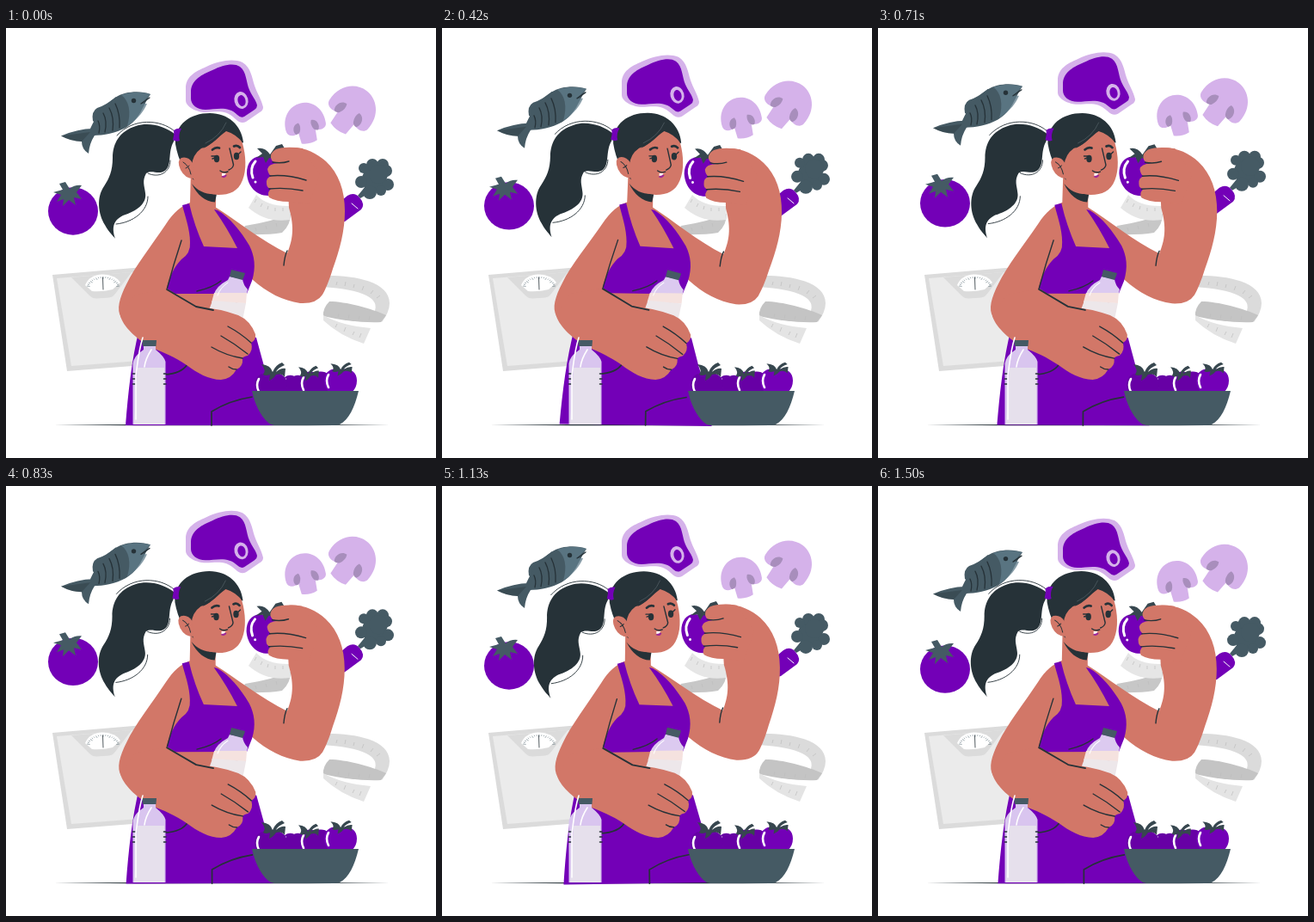
Recreate the animation shown at these times as an HTML page. Size 500 by 500 pixels, loop 1.54 s.

```html
<!DOCTYPE html>
<html lang="en">
<head>
<meta charset="utf-8">
<title>Healthy food</title>
<style>
html, body { margin: 0; width: 100%; height: 100%; overflow: hidden; background: #fff; }
svg { display: block; width: 100vw; height: 100vh; }
.p { fill: #7300b7; }
.l { fill: #d5b2ea; }
.m { fill: #a88ebc; }
.s { fill: #455a64; }
.d { fill: #263238; }
.k { fill: #d27768; }
.w { fill: #fff; }
.g { fill: #dbdbdb; }
.ln { fill: none; stroke: #263238; stroke-width: 1.4; stroke-linecap: round; stroke-linejoin: round; }
.wl { fill: none; stroke: #fff; stroke-width: 1.6; stroke-linecap: round; }
.tick { fill: none; stroke: #bdbdbd; stroke-width: .7; }
</style>
</head>
<body>
<svg viewBox="0 0 500 500">
<defs>
  <g id="mushroom">
    <path class="l" d="M-28 8C-30-14-15-27 0-27S30-14 28 8C27 15 18 16 12 13L11 28Q0 32-11 28L-12 13C-18 16-27 15-28 8Z"/>
    <path class="m" d="M-9-1C-17-1-20 9-16 14Q-13 15-10 12Q-6 5-9-1ZM9-1C17-1 20 9 16 14Q13 15 10 12Q6 5 9-1Z"/>
  </g>
  <g id="fruit">
    <path d="M0-9C-8-13-19-9-19 3C-19 14-11 21 0 21S19 14 19 3C19-9 8-13 0-9Z"/>
    <path class="wl" d="M-14-4Q-18 3-14 11" style="stroke-width:2.6"/>
  </g>
  <path id="leaf" fill="#37474f" d="M-14-9Q-3-8-1 0Q2-8 10-11L13-8Q5-5 3 0Q9-5 14-4L13 6Q10 1 3 3Q0 8-5 10L-4 3Q-9 5-12 3Q-8-2-14-9Z"/>
</defs>

<path class="d" d="M56 461.600L150 460.900H350L446 461.600L350 462.200H150Z"/>

<g id="scale">
  <path class="g" d="M54 287L160 278L172 391L71 399Z"/>
  <path fill="#ebebeb" d="M59 291L160 283L168 386L76 393Z"/>
  <path class="g" d="M76 290L97 311Q101 315 106 314.500L120 313.500Q124 313 127 309L146 284Z"/>
  <path class="w" d="M92 299Q97 287 112 286.500Q128 287 133 296L124 304Q112 307 100 306Z"/>
  <g id="dial" class="tick" style="stroke:#455a64;stroke-width:.5"></g>
  <path class="ln" d="M112.500 290L113 304" style="stroke-width:.8"/>
</g>

<g id="tape">
  <path fill="#c7c7c7" d="M331 216Q310 225 278 230L273 240Q305 241 321 238Q331 229 331 216Z"/>
  <path fill="#e6e6e6" d="M291 194Q304 208 331 207L330 223Q302 227 282 209Z"/>
  <path class="g" d="M368 288C400 287 446 293 446 320Q446 330 437 342L428 331Q440 306 368 301Z"/>
  <path fill="#c4c4c4" d="M376 318C395 318 425 326 442 334L436 342C415 343 390 340 369 335Q368 326 376 318Z"/>
  <path fill="#e4e4e4" d="M369 334Q390 346 424 349L416 367Q388 358 369 340Z"/>
  <path class="tick" d="M289 203l2-4M296 208l2-4M304 211l1-4M313 213v-4M322 213v-4M290 232l1 4M302 230l1 4M314 227l1 4M384 299l1-4M394 300l1-5M404 302l1-4M414 305l2-5M424 309l3-4M431 314l4-3M386 336l1-4M398 338l1-5M410 339l1-4M422 340l1-5M383 348l2-4M393 353l2-5M403 357l2-4M411 360l2-5"/>
</g>

<g id="food">
  <path class="l" d="M209 70C209 57 219 51 233 45C248 38 264 35 275 40C285 46 286 58 289 67C292 76 297 83 299 92Q299 96 295 98L279 109Q273 112 267 106C255 94 244 98 232 98C222 98 209 92 209 84Z"/>
  <path class="p" d="M215 73C216 60 228 54 240 49C252 43 265 40 272 45C280 51 279 63 283 72C286 79 291 84 292 90Q292 93 289 95L277 103Q273 105 269 101C258 90 244 95 232 95C222 95 215 89 215 82Z"/>
  <ellipse class="l" cx="273.500" cy="84" rx="8" ry="10" transform="rotate(-14 273.500 84)"/>
  <ellipse class="p" cx="274" cy="84.500" rx="4.500" ry="6.500" transform="rotate(-14 274 84.500)"/>

  <path class="s" d="M101 108Q99 97 106 93Q116 90 128 80L134 90L108 114ZM64 125.500Q84 117 101 117L106 112L110 118L103 125Q97 134 96 146Q88 141 88 132Q76 132 64 125.500Z"/>
  <path class="s" d="M168 77C157 73 139 73 127 81C113 90 105 102 98 117L101 125C114 125 128 122 139 116C156 106 158 92 168 77Z"/>
  <path fill="#607d8b" opacity=".75" d="M168 77C157 74 145 74 134 78C143 84 146 98 141 114C154 106 161 95 164 88L157 88Z"/>
  <path class="ln" d="M113 99Q118 108 115 121M120 93Q126 104 124 119M127 88Q133 100 132 116M107 108Q110 114 108 122M157 88L167 81" style="stroke-width:1.3"/>
  <path class="d" opacity=".35" d="M64 125.500L98 121L88 132Q76 132 64 125.500Z"/>
  <circle class="d" cx="148.500" cy="84.500" r="2.700"/>

  <ellipse class="p" cx="78" cy="213" rx="29" ry="27.700"/>
  <path class="s" d="M62 181L69 179L74 187Q80 182 88 183L82 191L88 199L79 197L81 206L73 200L66 207L67 199L59 202L64 194L55 191L66 188Z"/>

  <use href="#mushroom" transform="translate(347.500 109.500) rotate(-13) scale(.84)"/>
  <use href="#mushroom" transform="translate(403 94.500) rotate(37)"/>

  <path class="s" d="M418 184L424 191L412 198L409 195Z"/>
  <g id="florets" class="s"></g>
  <path class="p" d="M397 195Q405 190 411 197Q418 205 413 211L394 225L375 230L385 205Z"/>
  <path class="wl" d="M402 204L409 210" style="stroke-width:1"/>
</g>

<g id="woman">
  <path class="d" d="M197 124C185 114 166 109 151 114C132 120 124 134 124 151C124 166 120 175 114 184C105 197 107 216 115 229C120 238 125 242 127 245C123 233 124 224 136 218C152 213 164 204 162 192C161 183 158 178 163 169C170 164 178 172 186 165C193 158 188 144 195 132Z"/>
  <path class="ln" d="M129 125C148 104 180 106 196 120M128 228C148 226 165 213 165 196M165 169C178 175 191 168 191 154" style="stroke-width:.9"/>

  <path class="p" d="M155 350C146 385 142 425 139 462H316C311 436 307 412 300 393L291 360L220 340Z"/>
  <path class="ln" d="M239 462V446Q260 433 286 429M184 403Q204 402 211 391" style="stroke-width:1.7"/>

  <path class="k" d="M243 208C267 223 298 248 327 262C333 247 336 233 329 209L328 190L322 150L330 139C346 138 361 145 372 155C387 169 394 189 394 213C394 236 388 258 380 280C376 293 372 303 368 310Q361 321 342 320C322 317 304 308 286 292L262 275Z"/>
  <path class="ln" d="M323 276Q324 265 327 259"/>

  <path class="k" d="M215 165L214 203C204 207 195 214 186 228C170 252 150 277 140 298C132 314 128 327 134 337L215 330L272 345L268 309L282 300L287 270L244 210V185Z"/>
  <path class="d" d="M216 181C223 190 233 194 245 193L243 202.500C232 202 222 194 216 181Z"/>

  <path class="p" d="M205 206L213 204Q219 230 230 254L269 256Q257 232 242 211L246 212C260 220 273 236 283 253C289 265 291 278 286 294L280 309H196L187 303C190 289 196 277 204 269Q215 262 214 249C214 234 208 218 205 206Z"/>
  <path class="ln" d="M204 247Q195 274 187 304M222 306Q240 302 250 294"/>

  <g id="heldBottle">
    <path fill="#dccaf0" d="M260 289L275 292Q276 299 281 304L280 309L242 309Q245 300 258 293Z"/>
    <path fill="#f5e2df" d="M242 308H280L279 320L239 319Z"/>
    <path fill="#ede7ea" d="M240 317L279 320L275 340L236 328Z"/>
    <path class="s" d="M262 281L278 285Q277 289 275 293L260 289Z"/>
    <path class="wl" d="M258 296Q249 302 246 311" style="stroke-width:1"/>
  </g>

  <path class="k" d="M187 303L222 324Q248 326 270 334Q284 340 290 356Q291 363 285 366Q288 375 281 381Q276 382 275 384Q276 394 268 397Q262 408 250 409C236 409 222 401 210 392C197 383 183 377 170 372C150 361 136 346 133 335L150 310Z"/>
  <path class="ln" d="M187 304L221 324L241 328" style="stroke-width:1.8"/>
  <path class="ln" d="M258 347Q273 355 285 366M250 358Q266 367 281 379M239 371Q256 381 275 384M268 397Q263 397 259 394"/>

  <g id="head">
    <path class="d" d="M197 135C196 112 214 99 237 99C258 99 274 113 276 133L250 140L220 178Q202 164 197 135Z"/>
    <path class="k" d="M216 160Q217 147 227 140C239 137 248 125 257 117Q270 121 275 134C279 148 280 165 275 177C270 190 260 194 247 194C229 193 217 183 216 166Z"/>
    <path class="d" d="M257 112Q272 121 276 134Q267 123 256 120C247 126 241 135 229 140Q238 132 241 123Z"/>
    <path class="wl" d="M232 134Q249 126 256 110" style="stroke-width:.4;stroke:#78868c"/>
    <path class="k" d="M217 157Q212 149 204 151Q198 154 203 165Q208 175 218 175Z"/>
    <path class="ln" d="M206 156Q213 160 215 170M209 163Q212 162 213 160" style="stroke-width:1"/>
    <ellipse class="d" cx="245" cy="152" rx="3.200" ry="4.200"/>
    <ellipse class="d" cx="268" cy="149" rx="3.200" ry="4.200"/>
    <path class="ln" d="M243 149L239 149M243 151L240 152M270 147L273 144"/>
    <path class="ln" d="M240 141.500Q244 138 248 139.500M265 137.500Q269 135.500 272 139" style="stroke-width:2.700"/>
    <path class="ln" d="M260 140L264.500 159Q264 163 259 165"/>
    <path d="M250 173Q254 170 257 171Q255 176 250 173Z" fill="#9c279a"/>
    <path class="w" d="M251 169L256 169L254 171.500L251 172Z"/>
    <path class="ln" d="M249 166Q253 169 258 167"/>
    <path class="p" d="M195 119Q199 116 204 117Q200 124 202 131Q198 133 194 130Q196 124 195 119Z"/>
  </g>

  <path class="p" d="M302 151C289 146 280 155 280 169C281 184 291 195 305 195C320 194 328 183 327 168C326 154 315 147 302 151Z"/>
  <path class="wl" d="M290 155Q283 163 287 174" style="stroke-width:3"/>
  <circle class="w" cx="290" cy="179" r="1.500"/>
  <path fill="#37474f" d="M292 140Q301 138 307 147L314 137L321 135L324 140L313 148L318 154L306 151L302 157L299 150L291 151L298 146Z"/>
  <path class="k" d="M345 140Q325 137 314 141Q307 145 308 151Q309 157 317 157Q305 158 304 164Q305 171 309 172Q302 174 303 181Q303 186 308 187Q303 192 306 197Q314 202 329 202L352 205L365 170Z"/>
  <path class="ln" d="M310 156Q320 158 329 155M307 172Q326 170 349 177M306 187Q325 185 345 189"/>
</g>

<g id="bottle">
  <path fill="#d9c5ef" d="M160 370H174V374Q184 382 185.500 388V461H147.500V390Q149 381 160 374Z"/>
  <path fill="#e6e0ec" d="M153 395H184V461H149Z"/>
  <path class="s" d="M158 363H175L174.500 370H159Z"/>
  <path class="ln" d="M147.500 402h2.500M147.500 408h2.500M147.500 414h2.500M183.500 402h2.500M183.500 408h2.500M183.500 414h2.500" style="stroke-width:1.6"/>
  <path class="wl" d="M159 360C154 376 153 390 151 404V455M169 374Q162 385 161 394"/>
</g>

<g id="bowl">
  <g fill="#6700a5">
    <use href="#fruit" transform="translate(335 411) scale(.7)"/>
    <use href="#fruit" transform="translate(308 412)"/>
    <use href="#fruit" transform="translate(360 410)"/>
  </g>
  <use href="#fruit" class="p" transform="translate(389 407)"/>
  <use href="#leaf" transform="translate(311 400)"/>
  <use href="#leaf" transform="translate(352 402) scale(.85)"/>
  <use href="#leaf" transform="translate(390 397) scale(.9 .75)"/>
  <path class="s" d="M286 422H410C405 442 399 455 388 461Q386 462 382 462H312Q308 462 305 459C295 450 289 436 286 422Z"/>
</g>
</svg>
<script>
const $ = id => document.getElementById(id);

const ticks = Array.from({ length: 19 }, (_, i) => {
  const a = Math.PI * (1.07 + i / 18 * 0.86), r = i % 3 ? 16.5 : 15;
  const at = q => `${113 + q * 1.05 * Math.cos(a)} ${303 + q * 0.75 * Math.sin(a)}`;
  return `M${at(r)}L${at(18.5)}`;
}).join('');
$('dial').innerHTML = `<path d="${ticks}"/>`;

$('florets').innerHTML = [
  [428, 176, 14], [426, 159, 7], [438, 159, 7], [416, 163, 6], [442, 166, 7],
  [413, 179, 7], [444, 182, 7], [436, 189, 6], [423, 191, 8], [433, 170, 11]
].map(([x, y, r]) => `<circle cx="${x}" cy="${y}" r="${r}"/>`).join('');

const LOOP = 1540, STEPS = 37, FPS = 24, TAU = 2 * Math.PI;
const LAG = 0.036; // the food runs slightly ahead of the lean
const food = $('food'), woman = $('woman');

function draw(now) {
  const step = Math.min(STEPS - 1, Math.floor((now % LOOP + 5) * FPS / 1000));
  const u = step / STEPS;
  const lift = 4.65 * (Math.cos(TAU * (u + LAG)) - Math.cos(TAU * LAG));
  const lean = 0.8 * Math.sin(TAU * u);
  food.setAttribute('transform', `translate(0 ${lift.toFixed(3)})`);
  woman.setAttribute('transform', `rotate(${lean.toFixed(4)} 250 290)`);
}

const start = performance.now();
function tick() {
  draw(performance.now() - start);
  requestAnimationFrame(tick);
}
tick();
</script>
</body>
</html>
```
